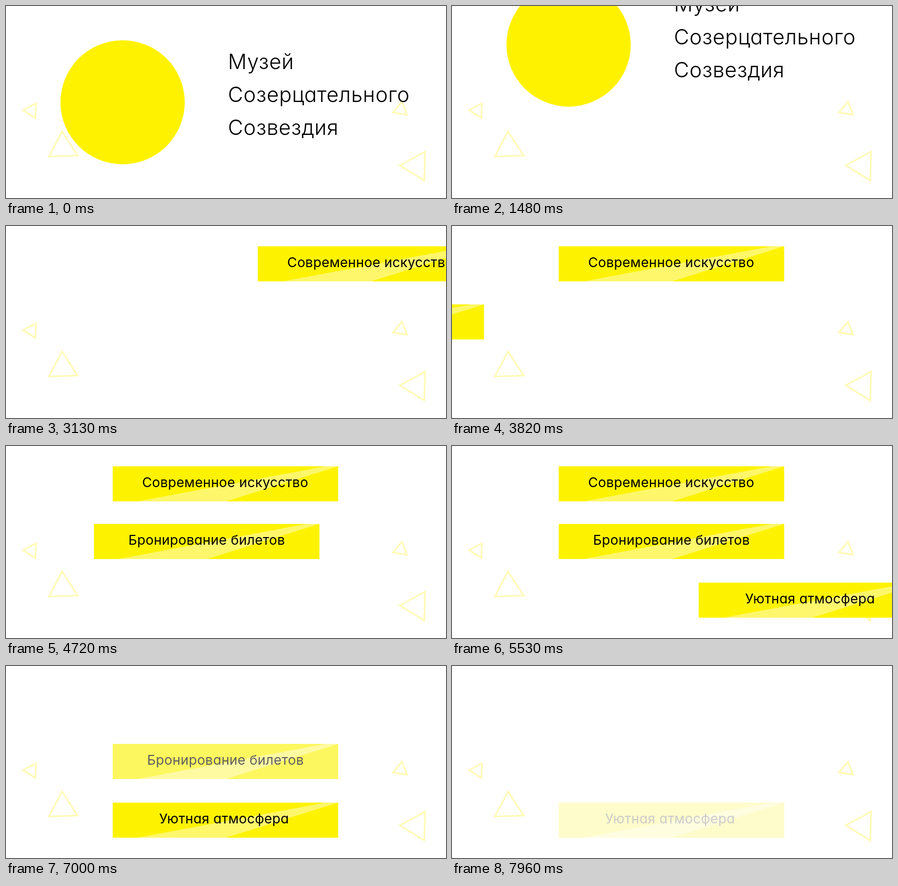
An HTML page for the animation above (7990 ms loop, 800 by 350 pixels).

```html
<!DOCTYPE html>
<html lang="ru">
<head>
<meta charset="utf-8">
<title>Музей</title>
<style>
  html, body { margin: 0; width: 100%; height: 100%; overflow: hidden; background: #fff; }
  svg { display: block; width: 800px; height: 350px; }
  text { font-family: Inter, "Open Sans", sans-serif; font-feature-settings: "cv11"; fill: #000; }
  .title text { font-size: 38px; font-weight: 300; letter-spacing: 0.6px; }
  .banner text { font-size: 24.5px; font-weight: 400; letter-spacing: 0.25px; text-anchor: middle; }
  .marks { fill: none; stroke: #fffab6; stroke-width: 3; }
</style>
</head>
<body>
<svg viewBox="0 0 800 350">
  <defs>
    <g id="plate">
      <rect width="410" height="64" fill="#fdf300"/>
      <path d="M45 64 L387 0 H410 L206 64 Z" fill="#fef76b"/>
    </g>
  </defs>
  <g class="marks">
    <path d="M31 190 L54.5 177.5 L53.5 204 Z"/>
    <path d="M102 228.5 L130 272.5 L78 274.5 Z"/>
    <path d="M720 174.5 L729 198 L703.5 194 Z"/>
    <path d="M716 290.5 L762 265.5 L760.5 318 Z"/>
  </g>
  <g class="title" id="title">
    <circle cx="212" cy="175.5" r="113" fill="#fff200"/>
    <text x="403.5" y="115">Музей</text>
    <text x="403.5" y="175">Созерцательного</text>
    <text x="403.5" y="235">Созвездия</text>
  </g>
  <g class="banner"><use href="#plate"/><text x="204.5" y="38">Современное искусство</text></g>
  <g class="banner"><use href="#plate"/><text x="205" y="38">Бронирование билетов</text></g>
  <g class="banner"><use href="#plate"/><text x="202.5" y="38">Уютная атмосфера</text></g>
</svg>
<script>
  const LOOP = 7990, STEP = 30, FADE = 675, FADE_START = 6070;
  const title = document.getElementById('title');
  const banners = document.querySelectorAll('.banner');
  const slides = [
    { start: 2380, end: 3700, from: [805, 37], to: [194, 37] },
    { start: 3700, end: 4780, from: [-420, 143], to: [194, 142] },
    { start: 4780, end: 6070, from: [802, 249], to: [194, 249] }
  ];

  const progress = (t, start, end) => Math.min(1, Math.max(0, (t - start) / (end - start)));
  const mix = (a, b, k) => a + (b - a) * k;
  const move = (el, x, y) => el.setAttribute('transform', `translate(${x} ${y})`);

  function draw(time) {
    // Motion advances in 30 ms steps after the opening hold.
    const t = time < 1030 ? 0 : Math.floor((time - 1030) / STEP) * STEP + 1030;
    move(title, 0, -289 * progress(t, 1000, 2320));
    slides.forEach((s, i) => {
      const k = progress(t, s.start, s.end);
      move(banners[i], mix(s.from[0], s.to[0], k), mix(s.from[1], s.to[1], k));
      const fade = FADE_START + i * FADE;
      banners[i].setAttribute('opacity', 1 - progress(t, fade, fade + FADE));
    });
  }

  let origin;
  function tick(now) {
    origin ??= now;
    draw((now - origin) % LOOP);
    requestAnimationFrame(tick);
  }
  draw(0);
  requestAnimationFrame(tick);
</script>
</body>
</html>
```
